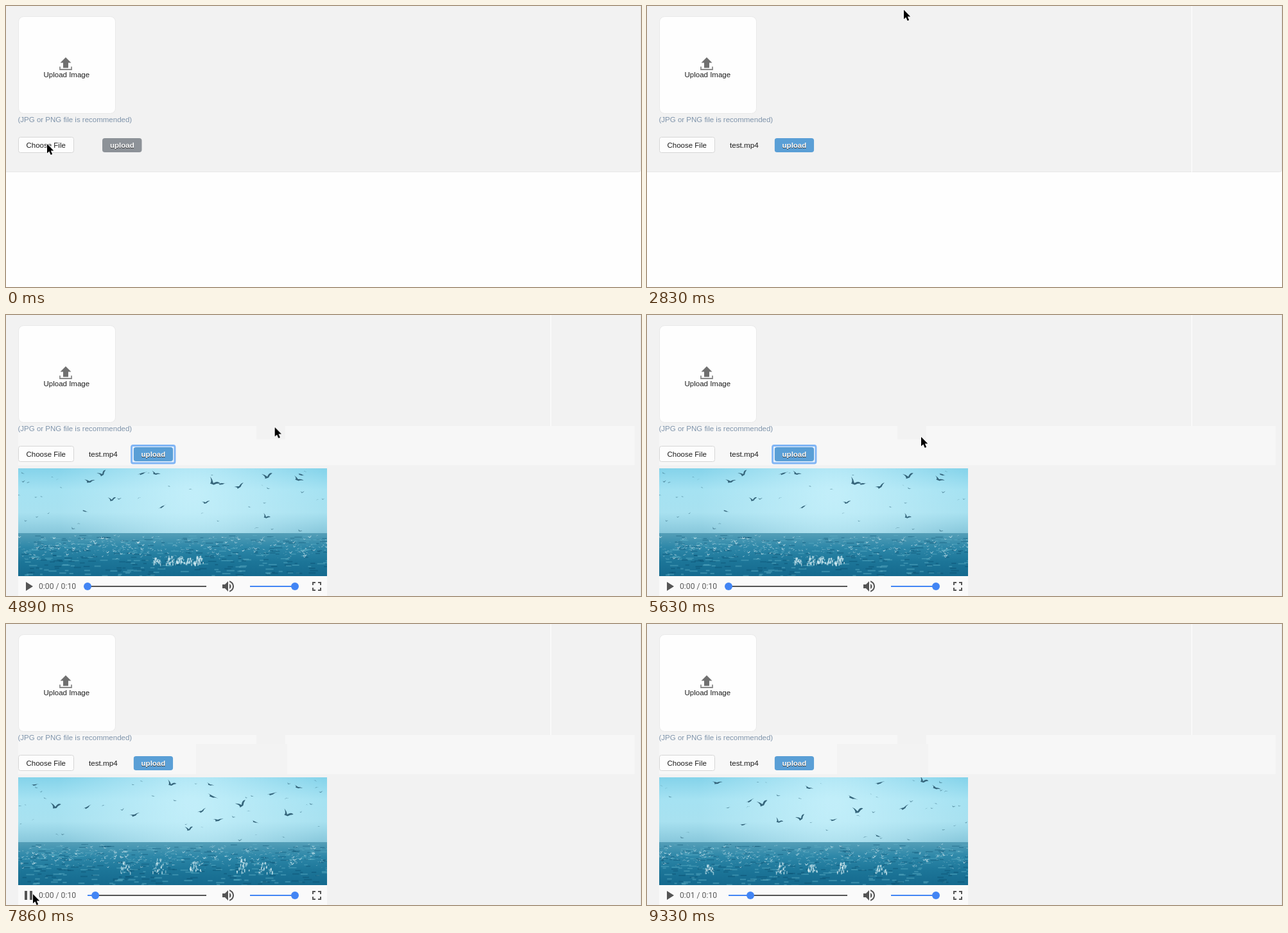
Recreate the animation shown at these times as an HTML page with a canvas. Size 989 by 438 pixels, loop 9.63 s.

```html
<!DOCTYPE html>
<html lang="en">
<head>
<meta charset="utf-8">
<title>File upload</title>
<style>
html, body { margin: 0; width: 100%; height: 100%; overflow: hidden; background: #fefefe; }
svg, canvas { position: absolute; left: 0; top: 0; }
svg { width: 989px; height: 438px; overflow: hidden; }
#movie { left: 19px; top: 239px; }
text { font: 11.5px "Liberation Sans", Arial, sans-serif; fill: #1c1c1c; }
.bold { font-weight: bold; fill: #fff; text-shadow: 0 1px 0 #333; }
.row { font-size: 11.7px; }
.end { text-anchor: end; }
.sheet text { font: 12.6px Inter, Roboto, sans-serif; fill: #2b2b2b; }
.sheet .mid { text-anchor: middle; }
.sheet .off { fill: #b9b9b9; }
.sheet .lit { fill: #fff; }
.frame { filter: drop-shadow(0 2px 3px rgba(0, 0, 0, .5)); }
.key { fill: #fff; stroke: #cbcbcb; }
.icons { fill: #555; }
.clock { font: 12.2px Roboto, sans-serif; fill: #5a5a5a; }

/* one shared 9.63 s loop, hard changes by default */
.a { animation: 9.63s step-end infinite; }
.page { animation-name: page; }
.seam { animation-name: seam; }
.upload { animation-name: upload; }
.face { animation-name: face; }
.pick { animation-name: on2240; }
.ready { animation-name: on1940; }
.band { animation-name: on3570; }
.panel { animation-name: panel; }
.ring { animation-name: ring; }
.video { animation-name: on4740; }
.worn { animation-name: on5930; }
.sheet { animation-name: sheet; }
.cursor { animation-name: cursor; }

@keyframes on1940 { 0% { visibility: hidden } 20.15%, 100% { visibility: visible } }
@keyframes on2240 { 0% { visibility: hidden } 23.26%, 100% { visibility: visible } }
@keyframes on3570 { 0% { visibility: hidden } 37%, 100% { visibility: visible } }
@keyframes on4740 { 0% { visibility: hidden } 49.2%, 100% { visibility: visible } }
@keyframes on5930 { 0% { visibility: hidden } 61.58%, 100% { visibility: visible } }
@keyframes panel { 0% { visibility: hidden } 37% { visibility: visible } 49.2%, 100% { visibility: hidden } }
@keyframes ring { 0% { visibility: hidden } 35.5% { visibility: visible } 72.2%, 100% { visibility: hidden } }
@keyframes page { 0% { height: 268.5px } 37% { height: 344.5px } 49.2%, 100% { height: 480px } }
@keyframes seam { 0% { height: 0 } 23.26% { height: 259px } 37%, 100% { height: 173px } }
@keyframes upload { 0% { transform: none } 23.26%, 100% { transform: translateX(48.6px) } }
@keyframes face { 0% { fill: #8d9298 } 23.26%, 100% { fill: #5a9fd6 } }
@keyframes sheet {
  0% { transform: translateY(-300px) }
  7.75% { transform: translateY(-225px); animation-timing-function: steps(4) }
  13.95%, 20% { transform: none }
  23.26% { transform: translateY(-70px); animation-timing-function: steps(4) }
  29.3%, 100% { transform: translateY(-300px) }
}
@keyframes cursor {
  0% { transform: translate(64px, 215px) }
  7.75% { transform: translate(64px, 215px); animation-timing-function: steps(2) }
  10.9% { transform: translate(200px, -30px) }
  27.83% { transform: translate(470px, -30px) }
  29.3% { transform: translate(400px, 6px); animation-timing-function: steps(3) }
  33.9% { transform: translate(232px, 215px) }
  37% { transform: translate(232px, 215px); animation-timing-function: steps(3) }
  41.55% { transform: translate(393px, 175px) }
  44.65% { transform: translate(404px, 171px) }
  46.2% { transform: translate(415px, 170px) }
  49.2% { transform: translate(417px, 172px); animation-timing-function: steps(6) }
  58.3% { transform: translate(427px, 190px) }
  60% { transform: translate(424px, 203px); animation-timing-function: steps(2) }
  63.1% { transform: translate(297px, 226px); animation-timing-function: steps(6) }
  72.2% { transform: translate(42px, 421px) }
  93.87% { transform: translate(420px, 416px) }
  95.4% { transform: translate(890px, 410px); visibility: visible }
  96.8%, 100% { transform: translate(890px, 410px); visibility: hidden }
}
</style>
</head>
<body>
<svg viewBox="0 0 989 438">
  <rect class="a page" x="-10" y="-10" width="998.5" height="268.5" rx="3" fill="#f2f2f2" stroke="#e7e7e7"/>
  <rect class="a seam" x="848" y="0" width="1" height="0" fill="#fff"/>
  <rect class="a band" x="19" y="173" width="960" height="61" fill="#f7f7f7"/>
  <rect class="a video" x="390" y="173" width="45" height="21" fill="#f2f2f2"/>
  <rect class="a worn" x="296" y="187" width="142" height="47" fill="#f3f3f3"/>

  <rect x="19.5" y="16.5" width="151" height="151" rx="8" fill="#fefefe" stroke="#e9e9e9"/>
  <path d="M93 80l8.5 8.500h-4.500v8h-8v-8h-4.500z" fill="#707070"/>
  <path d="M84 94.500v4.500h18v-4.500" fill="none" stroke="#8a8a8a" stroke-width="1.800"/>
  <text x="58.5" y="111">Upload Image</text>
  <text x="18.5" y="181" style="fill:#7e93aa">(JPG or PNG file is recommended)</text>

  <rect x="19.5" y="204.5" width="86" height="24" rx="3" fill="#fdfdfd" stroke="#d6d6d6"/>
  <text x="31.5" y="221">Choose File</text>
  <text class="a pick row" x="129" y="221">test.mp4</text>
  <rect class="a ring" x="195.5" y="203.5" width="67.500" height="27.500" rx="2.500" fill="#e6f0fc" stroke="#80b5f5" stroke-width="2.800"/>
  <g class="a upload">
    <rect class="a face" x="150" y="206" width="61.500" height="22" rx="4" fill="#8d9298"/>
    <text class="bold" x="162" y="221">upload</text>
  </g>

  <g class="a panel">
    <rect x="19.5" y="234.5" width="959" height="70" fill="#f7f7f7" stroke="#dcdcdc"/>
    <text class="row" x="30" y="258">test.mp4</text>
    <text class="row end" id="percent" x="967.500" y="258" style="fill:#3d74e6"></text>
    <rect id="bar" x="30" y="267" width="0" height="5" fill="#2d72e9"/>
    <text class="row" id="amount" x="30" y="290"></text>
  </g>

  <g class="a video">
    <rect x="19" y="407" width="481" height="31" fill="#fafafa"/>
    <g class="icons">
      <path id="toggle" transform="translate(23 411)"/>
      <path transform="translate(334 411)" d="M3 9v6h4l5 5V4L7 9H3zm13.500 3c0-1.770-1.020-3.290-2.500-4.030v8.050c1.480-.730 2.500-2.250 2.500-4.020zM14 3.230v2.060c2.890.860 5 3.540 5 6.710s-2.110 5.850-5 6.710v2.060c4.010-.910 7-4.490 7-8.770s-2.990-7.860-7-8.770z"/>
      <path transform="translate(472 411)" d="M7 14H5v5h5v-2H7v-3zm-2-4h2V7h3V5H5v5zm12 7h-3v2h5v-5h-2v3zM14 5v2h3v3h2V5h-5z"/>
      <rect x="127" y="422" width="185" height="2"/>
    </g>
    <text class="clock" id="clock" x="51" y="427"></text>
    <g fill="#4285f4">
      <rect id="played" x="127" y="422" width="0" height="2"/>
      <circle id="knob" cx="127" cy="423" r="6"/>
      <rect x="380" y="422" width="75" height="2"/>
      <circle cx="450" cy="423" r="6"/>
    </g>
  </g>
</svg>

<canvas class="a video" id="movie" width="481" height="168"></canvas>

<svg viewBox="0 0 989 438">
  <g class="a sheet">
    <rect class="frame" x="-40" y="-300" width="874" height="575" fill="#ededed"/>
    <rect x="79" y="-300" width="755" height="537" fill="#fefefe"/>
    <path d="M79.500-300V237M284.500-300V237" stroke="#d8d8d8"/>
    <text class="end" x="2.500" y="15">Folder</text>
    <text class="end" x="35" y="70">Documents</text>
    <text class="end" x="16.500" y="96">Desktop</text>
    <text class="end" x="40" y="122">Hard Drive</text>
    <text class="end" x="42.500" y="176">Remote Disc</text>
    <text class="end" x="6.500" y="230">0</text>
    <rect class="key" x="-60.500" y="246.500" width="76" height="20" rx="4"/>
    <rect class="key" x="662.500" y="246.500" width="77" height="20" rx="4"/>
    <text class="mid" x="700.700" y="261">Cancel</text>
    <rect class="key" x="748.500" y="246.500" width="77" height="20" rx="4" style="fill:#f8f8f8;stroke:#dadada"/>
    <text class="mid off" x="787" y="261">Open</text>
    <g class="a ready">
      <rect x="748" y="246" width="78" height="21" rx="4" fill="#3a8df6"/>
      <text class="mid lit" x="787" y="261">Open</text>
    </g>
  </g>
  <path class="a cursor" d="M0 0V14.500L3.300 11.400L5.700 17L8.200 16L5.800 10.500H10.300Z" stroke="#fff" stroke-width="1.200" paint-order="stroke"/>
</svg>

<script>
const LOOP = 9630, STEP = 148.2, PLAY_AT = 7200, MID = 654, STOP = 1840;
const PLAY = "M8 5v14l11-7z", PAUSE = "M6 19h4V5H6v14zm8-14v14h4V5h-4z";
const $ = id => document.getElementById(id);
const clamp = (v, lo, hi) => Math.min(hi, Math.max(lo, v));
const ctx = $("movie").getContext("2d");

// Each bird: x, y at the start, middle and end of the clip, then size.
const birds = [
  [111, 20, 58, 46, 90, 8, 8], [131, 9, 107, 46, 141, 36, 7], [193, 7, 181, 58, 161, 42, 8],
  [214, 8, 238, 11, 233, 16, 7], [304, 23, 303, 29, 301, 31, 9], [317, 23, 311, 66, 309, 53, 8],
  [344, 28, 348, 43, 381, 47, 8], [388, 13, 395, 25, 343, 8, 8], [441, 9, 436, 15, 411, 6, 7],
  [436, 17, 419, 58, 431, 16, 8], [146, 49, 26, 11, 131, 73, 6], [224, 59, 286, 52, 221, 64, 7],
  [292, 53, 266, 81, 271, 66, 6], [386, 76, 369, 69, 341, 91, 6], [104, 66, 299, 11, 186, 69, 6]
];
const splashes = [[216, 167, 78], [237, 219, 190], [252, 275, 238], [281, 350, 285], [268, 385, 345]];

// u runs 0..1..2 over the three poses
const pose = (a, b, c, u) => u < 1 ? a + (b - a) * u : b + (c - b) * (u - 1);

function seeded(seed) {
  return () => (seed = (seed * 16807) % 2147483647) / 2147483647;
}

function fade(y0, y1, ...colors) {
  const g = ctx.createLinearGradient(0, y0, 0, y1);
  colors.forEach((c, i) => g.addColorStop(i / (colors.length - 1), c));
  return g;
}

function bird(x, y, s, flap, tilt) {
  ctx.save();
  ctx.translate(x, y);
  ctx.rotate(tilt);
  ctx.beginPath();
  ctx.moveTo(-s, -flap * s);
  ctx.quadraticCurveTo(-s * .4, -flap * s * .7, 0, 0);
  ctx.quadraticCurveTo(s * .5, -flap * s, s * 1.1, -flap * s * .6);
  ctx.quadraticCurveTo(s * .5, -flap * s * .3, s * .2, s * .25);
  ctx.lineTo(-s * .5, s * .3);
  ctx.quadraticCurveTo(-s * .3, -flap * s * .2, -s, -flap * s);
  ctx.fill();
  ctx.restore();
}

function drawSky(u) {
  ctx.fillStyle = fade(0, 103, "#84d3ea", "#a5e2f2", "#a8e1f0", "#86c6da");
  ctx.fillRect(0, 0, 481, 103);
  const glow = ctx.createRadialGradient(270, 40, 10, 270, 40, 210);
  glow.addColorStop(0, "rgba(200,241,251,.8)");
  glow.addColorStop(1, "rgba(200,241,251,0)");
  ctx.fillStyle = glow;
  ctx.fillRect(0, 0, 481, 103);

  const rnd = seeded(41);
  ctx.fillStyle = "rgba(52,104,126,.75)";
  for (let i = 0; i < 34; i++) {
    const x = (rnd() * 520 + 481 - u * 25) % 481, y = 5 + rnd() * 92;
    bird(x, y + Math.sin(u * 3 + i) * 3, 1.8 + rnd() * 1.8, Math.sin(i + u * 9) * .6, rnd() - .5);
  }
  ctx.fillStyle = "#35657b";
  birds.forEach(([a, b, c, d, e, f, s], i) =>
    bird(pose(a, c, e, u), pose(b, d, f, u), s, .35 + .5 * Math.sin(i * 2.1 + u * 8), Math.sin(i * 5) * .5));
}

function drawSea(u) {
  ctx.fillStyle = fade(101, 168, "#559fb8", "#2d87a8", "#1c7598", "#156a8e");
  ctx.fillRect(0, 101, 481, 67);
  const rnd = seeded(97);
  for (let i = 0; i < 330; i++) {
    const y = 104 + rnd() * 64, x = (rnd() * 481 + 481 + u * 14 * Math.sin(i)) % 481;
    ctx.fillStyle = i % 2 ? "rgba(10,78,112,.45)" : "rgba(105,185,205,.4)";
    ctx.fillRect(x, y, 4 + rnd() * 9, 1 + (y - 100) / 60);
  }
  for (let i = 0; i < 420; i++) {
    const y = 103 + (rnd() + rnd()) * 20, x = (rnd() * 481 + 481 - u * 18 - Math.sin(i) * u * 6) % 481;
    const s = .8 + rnd() * 2.2;
    ctx.fillStyle = `rgba(226,243,247,${.35 + rnd() * .55})`;
    bird(x, y, s, Math.sin(i + u * 8), rnd() - .5);
  }
  const tall = pose(13, 23, 17, u);
  splashes.forEach(([a, b, c], n) => {
    const cx = pose(a, b, c, u);
    for (let i = 0; i < 34; i++) {
      const h = rnd() * tall * (n % 2 ? 1 : .8);
      ctx.fillStyle = `rgba(225,246,250,${.3 + rnd() * .5})`;
      ctx.fillRect(cx + (rnd() - .5) * (7 + (tall - h) * .7), 149 - h, 1.5, 1 + rnd() * 4);
    }
  });
}

function render(t) {
  const now = Math.floor(t / STEP) * STEP;
  const p = clamp((now - 3556) / 435, 0, 1);
  $("percent").textContent = Math.round(p * 100) + "%";
  $("amount").textContent = `Uploaded: ${(p * .92).toFixed(2)}M/0.92M`;
  $("bar").setAttribute("width", 938 * p);

  const v = clamp(now - PLAY_AT, 0, STOP);
  const x = v * .0185;
  $("played").setAttribute("width", x);
  $("knob").setAttribute("cx", 127 + x);
  $("clock").textContent = `0:0${Math.floor(v / 1000)} / 0:10`;
  $("toggle").setAttribute("d", now > 7100 && v < STOP ? PAUSE : PLAY);

  const u = v < MID ? v / MID : 1 + (v - MID) / (STOP - MID);
  drawSky(u);
  drawSea(u);
}

let start;
function tick(time) {
  start ??= time;
  render((time - start) % LOOP);
  requestAnimationFrame(tick);
}
render(0);
requestAnimationFrame(tick);
</script>
</body>
</html>
```
